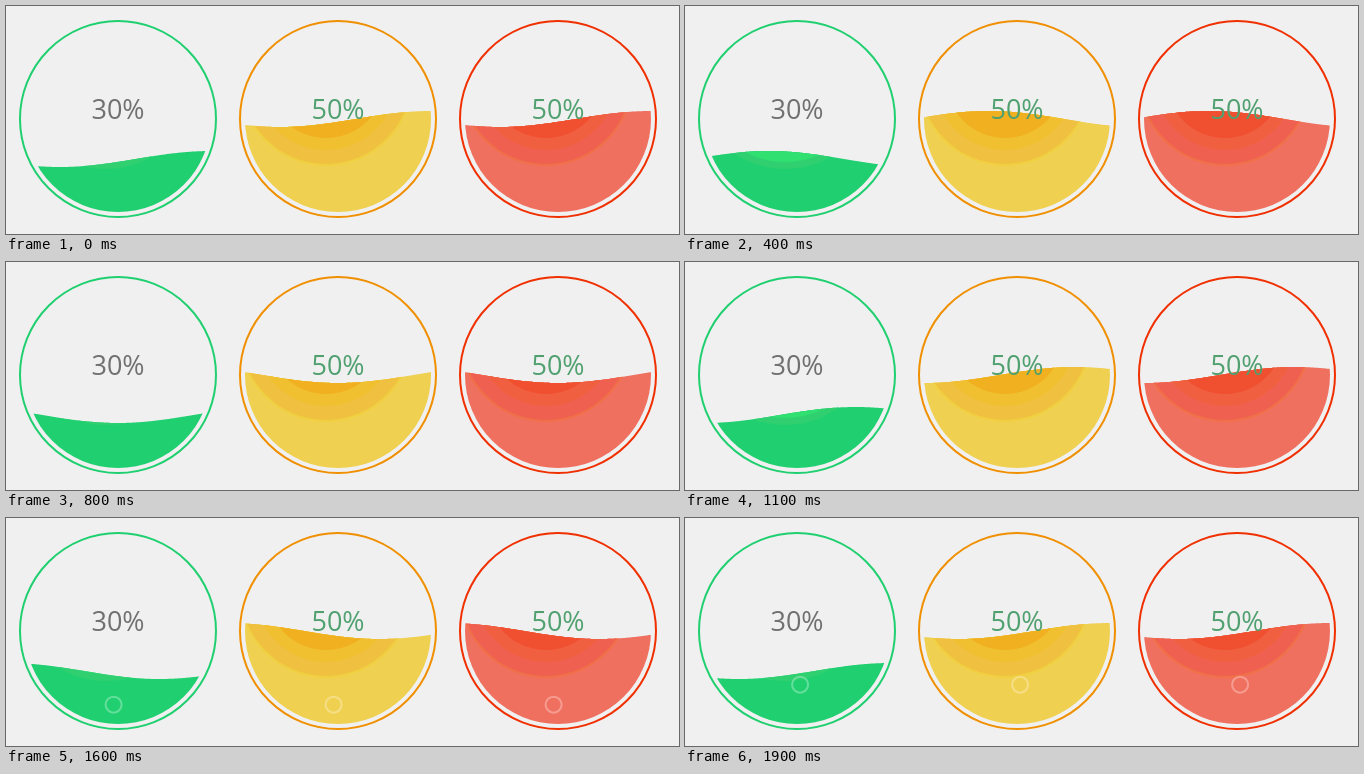
An HTML page with a canvas that plays this animation: 673 by 228 pixels, repeating every 2 s.

```html
<!DOCTYPE html>
<html lang="en">
<head>
<meta charset="utf-8">
<title>Liquid gauges</title>
<style>
  html, body { margin: 0; width: 100%; height: 100%; overflow: hidden; background: #f0f0f0; }
  canvas { display: block; }
</style>
</head>
<body>
<canvas id="stage" width="673" height="228"></canvas>
<script>
const ctx = document.getElementById('stage').getContext('2d');
const LOOP = 2000, STEP = 100;
const CY = 113, RING = 98, BOWL = 93;
const WAVE = { height: 8, k: 0.0208 };

// bands: [radius, colour], largest first, around a glow left of and above the centre
const gauges = [
  { cx: 112, level: 153, label: '30%', ink: '#707070', ring: '#20d070', fill: '#20d070',
    bands: [[90, '#30d070'], [83, '#30e070']] },
  { cx: 332, level: 113, label: '50%', ink: '#50a070', ring: '#f09000', fill: '#f0d050',
    bands: [[87, '#f0d040'], [85, '#f0c040'], [71, '#f0c030'], [59, '#f0b020']] },
  { cx: 552, level: 113, label: '50%', ink: '#50a070', ring: '#f03000', fill: '#f07060',
    bands: [[87, '#f07048'], [85, '#f06050'], [71, '#f06040'], [59, '#f05030']] }
];

// [time, wave phase]
const phases = [[0, 0], [200, 1.25], [600, 3.8], [1100, 7], [1400, 9.3], [1700, 11.1], [1900, 12.57]];

function phaseAt(t) {
  const i = Math.max(1, phases.findIndex(p => p[0] >= t));
  const [t0, a] = phases[i - 1], [t1, b] = phases[i];
  return a + (b - a) * (t - t0) / (t1 - t0);
}

function circle(x, y, r) {
  ctx.beginPath();
  ctx.arc(x, y, r, 0, Math.PI * 2);
}

function clipToWater(g, phase) {
  circle(g.cx, CY, BOWL);
  ctx.clip();
  ctx.beginPath();
  for (let dx = -BOWL - 1; dx <= BOWL + 1; dx++) {
    ctx.lineTo(g.cx + dx, g.level - WAVE.height * Math.cos(WAVE.k * (dx - BOWL) + phase));
  }
  ctx.lineTo(g.cx + BOWL + 1, 228);
  ctx.lineTo(g.cx - BOWL - 1, 228);
  ctx.clip();
}

function drawBubble(cx, t) {
  const x = cx - 4.6 * Math.cos((t - 1555) * 0.0067);
  circle(x, 200 - (t - 1400) / 15, 8);
  ctx.strokeStyle = 'rgba(255,255,255,.3)';
  ctx.lineWidth = 2;
  ctx.stroke();
}

function drawGauge(g, t) {
  circle(g.cx, CY, RING);
  ctx.strokeStyle = g.ring;
  ctx.lineWidth = 2;
  ctx.stroke();

  ctx.save();
  clipToWater(g, phaseAt(t));
  ctx.fillStyle = g.fill;
  ctx.fillRect(g.cx - 100, 0, 200, 228);
  for (const [r, colour] of g.bands) {
    circle(g.cx - 12, 73, r);
    ctx.fillStyle = colour;
    ctx.fill();
  }
  if (t >= 1200) drawBubble(g.cx, t);
  ctx.restore();

  ctx.fillStyle = g.ink;
  ctx.font = '27px "Open Sans", "Noto Sans", sans-serif';
  ctx.textAlign = 'center';
  ctx.fillText(g.label, g.cx, CY);
}

const start = performance.now();
function render() {
  const elapsed = Math.max(0, performance.now() - start) % LOOP;
  const t = Math.floor(elapsed / STEP) * STEP;
  ctx.fillStyle = '#f0f0f0';
  ctx.fillRect(0, 0, 673, 228);
  gauges.forEach(g => drawGauge(g, t));
  requestAnimationFrame(render);
}
render();
</script>
</body>
</html>
```
